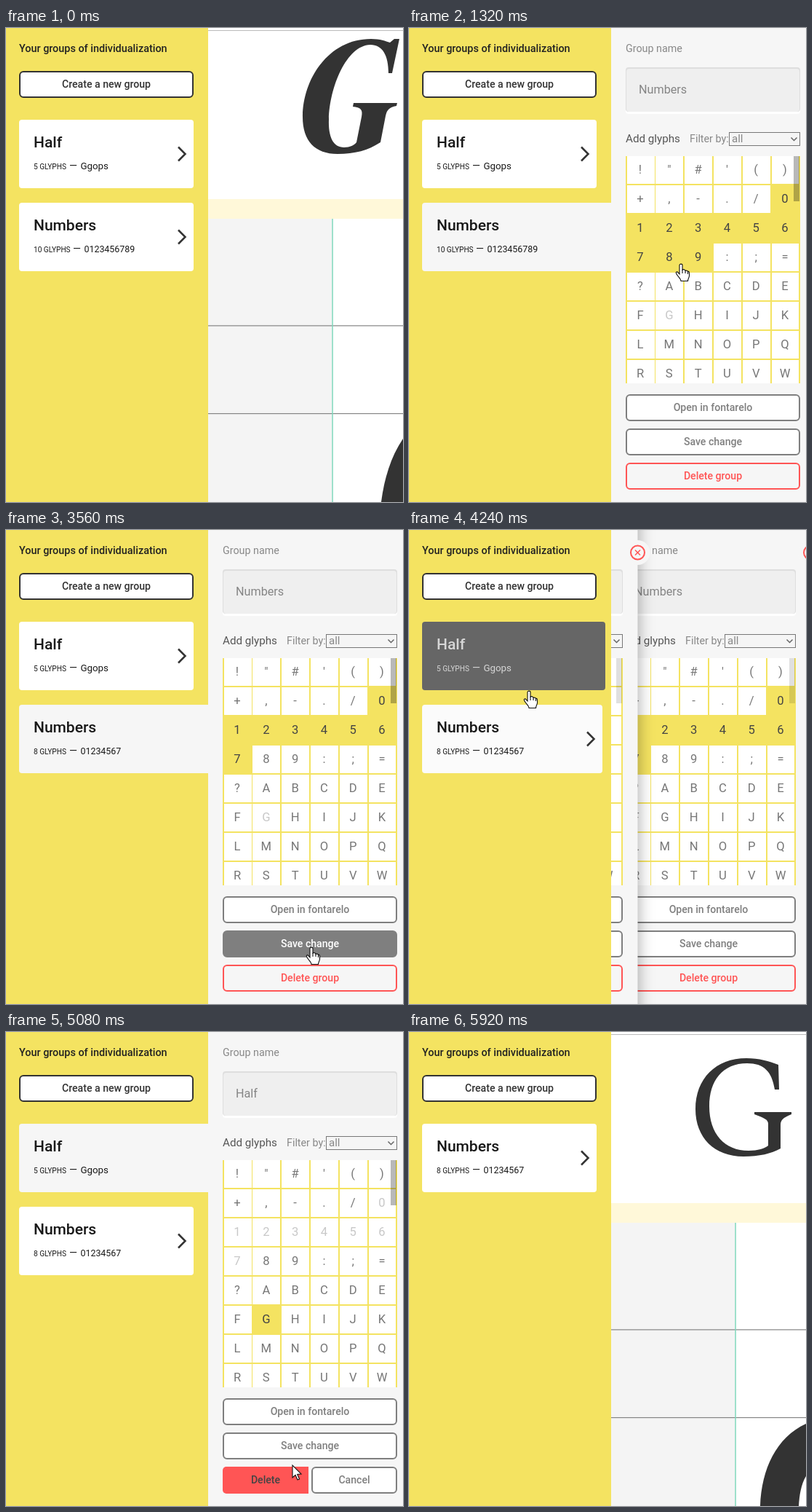
Write an HTML page with a canvas that moves like this. It is 546 px wide and 651 px high and loops after 6320 ms.

```html
<!DOCTYPE html>
<html lang="en">
<head>
<meta charset="utf-8">
<title>Glyph groups</title>
<style>
html, body { margin: 0; width: 546px; height: 651px; overflow: hidden; }
canvas { display: block; }
</style>
</head>
<body>
<canvas id="stage" width="546" height="651"></canvas>
<script>
const ctx = document.getElementById('stage').getContext('2d');
const LOOP = 6320, STEP = 40;
const YELLOW = '#f4e361', RED = '#ff5555', GREY = '#7f7f7f', PANEL = 246;
const FAMILY = 'Roboto, "Open Sans", sans-serif';
const ROWS = ['!"#\'()', '+,-./0', '123456', '789:;=', '?ABCDE', 'FGHIJK', 'LMNOPQ', 'RSTUVW'];

const ITALIC_G = new Path2D('M541 15L531 62H526C526 38 518 23 501 23C468 24 445 82 444 125' +
  'C443 150 450 164 465 164C473 164 479 161 482 157L489 122C491 112 488 109 477 108L478 103H538L537 107' +
  'C527 109 524 112 522 121L515 157C498 168 480 173 456 173C425 173 408 155 408 122C408 71 443 15 502 15' +
  'C515 15 522 18 528 20L534 15Z');
const ROMAN_G = new Path2D('M508 45L509 79H503C499 54 488 43 465 43C431 43 413 67 413 102' +
  'C413 140 434 163 467 163C480 163 489 160 494 156V126C494 120 488 118 475 113V110H526V113' +
  'C514 118 511 121 511 128V160C498 167 482 171 460 171C420 171 394 145 394 106C394 64 422 36 464 36C482 36 495 40 508 45Z');
const ITALIC_BOWL = new Path2D('M516 651C520 620 529 589 546 564V651Z');
const ROMAN_BOWL = new Path2D('M483 651C485 600 505 557 546 538V610C539 622 537 636 536 651Z');
const HAND = new Path2D('M-2 1C-2 -1.5 2 -1.5 2 1V7C4 6 5.5 7 6 8.5C7.5 7.5 9 8.5 9.5 9.5C11.5 9 11.5 11 11.5 12V15' +
  'C11.5 18 9.5 19 9.5 22.5H0C0 19 -5 16 -6.5 12C-7.5 10 -5 9 -4 11L-2 13Z');
const KNUCKLES = new Path2D('M2 7V12M6 8.5V12M9.5 9.5V13');
const ARROW = new Path2D('M0 0V17L4 13.5L7 20L9.5 19L6.7 12.5L12 12Z');

// Pointer track: time, x, y
const TRACK = [
  [280, 95, 645], [400, 205, 405], [480, 181, 320], [560, 182, 268], [920, 182, 268],
  [1080, 290, 395], [1160, 345, 438], [1280, 374, 325], [1520, 374, 325], [1600, 351, 310],
  [1680, 364, 299], [1840, 364, 299], [1880, 368, 298], [2080, 368, 298], [2240, 392, 312],
  [2480, 392, 312], [2640, 394, 354], [2720, 398, 385], [2760, 404, 445], [2800, 411, 495],
  [3200, 420, 574], [3640, 420, 574], [3920, 175, 200], [4080, 168, 190], [4240, 165, 222],
  [4600, 412, 505], [4760, 420, 608], [4920, 420, 608], [5080, 394, 595], [5240, 368, 607],
  [5360, 368, 607], [5560, 398, 470], [5840, 560, 240]
];

const clamp = v => Math.max(0, Math.min(1, v));
const ramp = (t, a, b) => clamp((t - a) / (b - a));
const ease = k => k < .5 ? 2 * k * k : 1 - 2 * (1 - k) * (1 - k);
const lerp = (a, b, k) => a + (b - a) * k;
const grey = v => `rgb(${v},${v},${v})`;

function pointer(t) {
  const i = TRACK.findIndex(p => p[0] > t);
  if (i < 1) return { x: -99, y: -99 };
  const a = TRACK[i - 1], b = TRACK[i], k = (t - a[0]) / (b[0] - a[0]);
  return { x: lerp(a[1], b[1], k), y: lerp(a[2], b[2], k) };
}

const inside = (p, x, y, w, h) => p.x >= x && p.x < x + w && p.y >= y && p.y < y + h;

// Whole-pixel panel offset: slides in from the left at `enter`, back out at `leave`
const slide = (t, enter, leave, time) =>
  -Math.round(280 * (1 - ease(ramp(t, enter, enter + time)) + ease(ramp(t, leave, leave + time))));

function rect(x, y, w, h, color) {
  ctx.fillStyle = color;
  ctx.fillRect(x, y, w, h);
}

function box(x, y, w, h, r, fill, line) {
  ctx.beginPath();
  ctx.roundRect(x, y, w, h, r);
  ctx.fillStyle = fill;
  ctx.fill();
  if (!line) return;
  ctx.strokeStyle = line;
  ctx.lineWidth = 2;
  ctx.stroke();
}

function text(s, x, y, size, color, weight = 400, align = 'left') {
  ctx.font = `${weight} ${size}px ${FAMILY}`;
  ctx.textAlign = align;
  ctx.fillStyle = color;
  ctx.fillText(s, x, y);
}

function polyline(points, color, width) {
  ctx.beginPath();
  points.forEach(([x, y]) => ctx.lineTo(x, y));
  ctx.strokeStyle = color;
  ctx.lineWidth = width;
  ctx.stroke();
}

function button(label, x, y, w, color, hot, base = '#fff') {
  box(x + 1, y + 1, w - 2, 35, 5, hot ? color : base, color);
  text(label, x + w / 2, y + 23, 14.1, hot ? '#fff' : color, 500, 'center');
}

function drawPreview(t) {
  const roman = t > 2000;
  rect(278, 0, 268, 651, '#fff');
  rect(278, 3, 268, 1, '#bbb');
  rect(278, 235, 268, 27, '#fff8d9');
  rect(278, 262, 170, 389, '#f4f4f4');
  rect(278, 408.3, 268, 1.2, '#858585');
  rect(278, 529, 268, 1.2, '#858585');
  rect(448.3, 262, 1.5, 389, '#7fd6bb');
  ctx.fillStyle = '#333';
  ctx.fill(roman ? ROMAN_G : ITALIC_G);
  ctx.fill(roman ? ROMAN_BOWL : ITALIC_BOWL);
}

function drawGrid(p) {
  ctx.save();
  ctx.beginPath();
  ctx.rect(298, 176, 240, 312);
  ctx.clip();
  rect(298, 176, 240, 312, YELLOW);
  ROWS.forEach((row, r) => [...row].forEach((ch, c) => {
    const x = Math.round(299.6 + 39.8 * c), y = 176 + 40 * r;
    const off = p.used.includes(ch);
    const hot = p.hover && !off && inside(p.hover, x, y, 38, 38);
    const on = p.chosen.includes(ch) || hot;
    if (!on) rect(x, y, c < 5 ? 38 : 37, 38, '#fff');
    text(ch, 318 + 39.8 * c, y + 24, 16.6, on ? '#444' : off ? '#c8c8c8' : '#777', 400, 'center');
  }));
  rect(529, 176, 8, 62, `rgba(0,0,0,${p.thumb})`);
  ctx.restore();
}

function drawPanel(p) {
  ctx.save();
  ctx.translate(p.shift, 0);
  ctx.save();
  if (p.shift < 0) {
    ctx.shadowColor = 'rgba(0,0,0,.35)';
    ctx.shadowBlur = 20;
  }
  rect(278, -30, 280.5, 711, grey(PANEL));
  ctx.restore();

  ctx.beginPath();
  ctx.arc(558.5, 31, 17, 0, 7);
  ctx.fillStyle = grey(PANEL);
  ctx.fill();
  ctx.beginPath();
  ctx.arc(558.5, 31, 9.5, 0, 7);
  ctx.strokeStyle = RED;
  ctx.lineWidth = 2;
  ctx.stroke();
  polyline([[555, 27.5], [562, 34.5]], RED, 1.5);
  polyline([[562, 27.5], [555, 34.5]], RED, 1.5);

  text('Group name', 298, 33, 14.3, '#888');
  box(298, 57, 240, 61, 4, '#fff');
  box(298, 54, 240, 61, 4, '#dedede');
  box(299, 56, 238, 59, 4, '#efefef');
  text(p.name, 316, 90, 16.2, '#858585');
  text('Add glyphs', 298, 157, 15.2, '#555');
  text('Filter by:', 386, 157, 14.3, '#888');
  rect(440, 143, 98, 19, '#777');
  rect(441, 144, 96, 17, '#f5f5f5');
  text('all', 444, 157, 15, '#888');
  polyline([[525.5, 150.5], [529.5, 154.5], [533.5, 150.5]], '#666', 1.5);
  drawGrid(p);

  const hot = y => p.hover && inside(p.hover, 298, y, 240, 37);
  button('Open in fontarelo', 298, 503, 240, GREY, hot(503));
  button('Save change', 298, 550, 240, GREY, hot(550));
  if (p.confirm) {
    box(298, 597, 118, 37, [5, 0, 0, 5], RED);
    text('Delete', 357, 620, 14.1, '#444', 500, 'center');
    button('Cancel', 420, 597, 118, GREY, false);
  } else {
    button('Delete group', 298, 597, 240, RED, hot(597), grey(PANEL));
  }
  ctx.restore();
}

function drawCard(y, name, count, glyphs, open, dark) {
  const right = 258 + 20 * open;
  const bg = lerp(lerp(255, PANEL, open), 102, dark);
  const ink = grey(lerp(24, 215, dark));
  const size = glyphs.length > 5 ? 12.4 : 13.3;
  box(18, y, right - 18, 94, open === 1 ? [4, 0, 0, 4] : 4, grey(bg));
  text(name, 38, y + 38, 21, ink, 500);
  text(count + ' GLYPHS', 38, y + 68, 10.1, ink);
  const x = count > 9 ? 93 : 88;
  text('—', x - 1, y + 68, 14, ink);
  text(glyphs, x + 14.5, y + 68, size, ink);
  if (open > .8 || dark > .5) return;
  polyline([[right - 21, y + 37.5], [right - 11.5, y + 47], [right - 21, y + 56.5]], '#333', 2.5);
}

function drawSidebar(t) {
  rect(0, 0, 278, 651, YELLOW);
  text('Your groups of individualization', 18, 33, 14.4, '#222', 500);
  button('Create a new group', 18, 59, 240, '#333', false);
  const removed = t >= 5400, saved = t >= 3500;
  if (!removed) {
    drawCard(126, 'Half', 5, 'Ggops', ramp(t, 4120, 4320),
      ramp(t, 3880, 3960) - ramp(t, 4240, 4480));
  }
  drawCard(lerp(240, 126, ease(ramp(t, 5400, 5600))), 'Numbers', saved ? 8 : 10,
    saved ? '01234567' : '0123456789',
    ramp(t, 560, 760) - ramp(t, 4120, 4320),
    ramp(t, 440, 520) - ramp(t, 640, 840));
}

function drawPointer(t) {
  const p = pointer(t);
  const panelOpen = t > 800 && t < 5440;
  const overPanel = inside(p, 300, 176, 236, 312) ||
    [503, 550, 597].some(y => inside(p, 298, y, 240, 37));
  const overCard = [126, 240].some(y => inside(p, 18, y, 240, 98));
  const shape = overCard || (panelOpen && overPanel) ? HAND : ARROW;
  ctx.save();
  ctx.translate(p.x, p.y);
  ctx.fillStyle = '#fff';
  ctx.fill(shape);
  ctx.strokeStyle = '#111';
  ctx.lineWidth = 1.1;
  ctx.stroke(shape);
  if (shape === HAND) ctx.stroke(KNUCKLES);
  ctx.restore();
}

function draw(t) {
  const hover = pointer(t - STEP);
  drawPreview(t);
  if (t >= 560 && t < 4560) {
    drawPanel({
      name: 'Numbers',
      shift: slide(t, 560, 4208, 316),
      chosen: '01234567' + (t < 1860 ? '8' : '') + (t < 2360 ? '9' : ''),
      used: t < 4160 ? 'G' : '',
      thumb: t >= 920 && t < 4000 ? .28 : .12,
      hover: t >= 920 && t < 4120 ? hover : null
    });
  }
  if (t >= 4160 && t < 5720) {
    drawPanel({
      name: 'Half',
      shift: slide(t, 4160, 5400, 316),
      chosen: 'G',
      used: '01234567',
      thumb: t < 4600 ? .12 : .28,
      hover: t >= 4480 && t < 5400 ? hover : null,
      confirm: t >= 4880
    });
  }
  drawSidebar(t);
  drawPointer(t);
}

const start = performance.now();
function tick() {
  const t = (performance.now() - start) % LOOP;
  draw(Math.floor(t / STEP) * STEP);
  requestAnimationFrame(tick);
}
tick();
</script>
</body>
</html>
```
